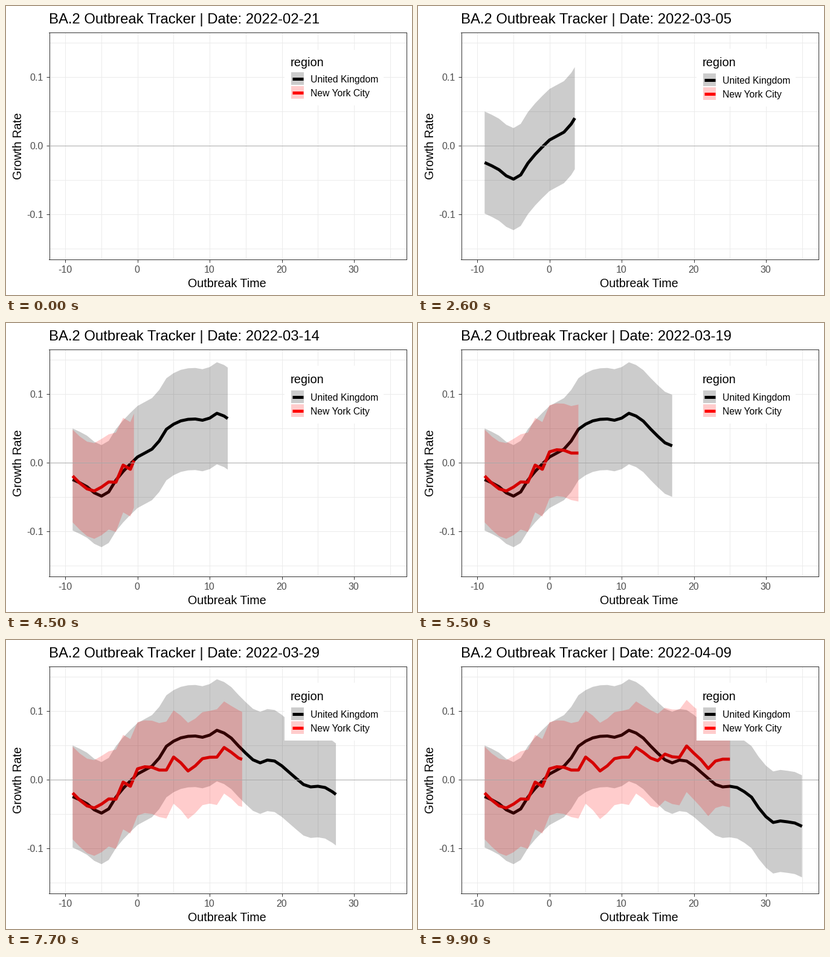
A matplotlib script for the animation above (10000 ms loop, 672 px wide and 480 px high).

```python
import matplotlib.pyplot as plt
import numpy as np
from matplotlib.animation import FuncAnimation
from matplotlib.patches import Rectangle

W, H = 672, 480
FRAMES, DAYS = 100, 47
START = np.datetime64("2022-02-21")
PT = 0.75  # points per pixel at 96 dpi
FIRST_X = -9

plt.rcParams["font.family"] = "Liberation Sans"
plt.rcParams["axes.unicode_minus"] = False

# Daily growth rates and interval half-widths, in thousandths
UK_RATE = [
    -24.5, -29.3, -35, -43.8, -48.6, -42.5, -25.4, -12.7, -1.8, 8.3, 14, 19.7,
    31.5, 48.6, 56, 60.8, 63, 63.5, 61.7, 64.8, 71.8, 67.8, 60.4, 49, 38.5,
    28.9, 24.5, 28.5, 27.1, 20.1, 10.9, 1.8, -7, -10.5, -9.6, -11.4, -17.5,
    -25.4, -41.1, -53.8, -62.2, -60, -61.3, -63, -67.8]
NYC_RATE = [
    -19.3, -29.8, -38.1, -41.1, -35.5, -28, -28.4, -3.5, -9.6, 15.8, 18.8, 18,
    14, 14, 32.9, 24.5, 12.7, 20.1, 30.6, 32.6, 32.8, 46.8, 39.8, 31.5, 27.6,
    37.2, 33.3, 32.4, 49, 38.5, 28.9, 16.2, 27.1, 29.8, 29.8]
NYC_HALF = [
    67.4, 67.8, 68.7, 69.6, 70, 69.2, 72.2, 68.7, 68.7, 67.8, 67.4, 67.8,
    68.3, 70.5, 67.8, 68.7, 70, 68.7, 67.6, 67.4, 69.6, 67, 67.4, 69.6, 68.3,
    67.4, 68.7, 69.6, 67, 67.4, 69.2, 69.2, 68.3, 67.8, 70]

fig = plt.figure(figsize=(W / 96, H / 96), dpi=96, facecolor="white")

# Plot panel
L, R, T, B = 71.5, 662.5, 43.5, 420.5
ax = fig.add_axes([L / W, 1 - B / H, (R - L) / W, (B - T) / H])
ax.set(xlim=(-12.25, 37.25), ylim=(-0.165, 0.165))
ax.set_axisbelow(True)
ax.set_xticks(range(-10, 31, 10), labels=[""] * 5)
ax.set_yticks([-0.1, 0, 0.1], labels=[""] * 3)
ax.set_xticks(range(-5, 36, 10), minor=True)
ax.set_yticks([-0.15, -0.05, 0.05, 0.15], minor=True)
ax.grid(which="both", color="#EBEBEB", lw=PT)
ax.tick_params(which="major", length=5 * PT, width=PT, color="#333333")
ax.tick_params(which="minor", length=0)
for spine in ax.spines.values():
    spine.set(color="#333333", linewidth=PT)
ax.axhline(0, color="#A9A9A9", lw=PT, zorder=4)

# Pixel overlay for text and legend
ui = fig.add_axes([0, 0, 1, 1])
ui.set(xlim=(0, W), ylim=(H, 0))
ui.axis("off")


def label(x, y, s, size, color="black", ha="left", **kw):
    return ui.text(x, y, s, fontsize=size * PT, color=color, ha=ha,
                   va="baseline", rotation_mode="anchor", **kw)


def box(x0, x1, height, color):
    patch = Rectangle((x0, 0), x1 - x0, height, fc=color, lw=0)
    return ui.add_patch(patch)


title = label(71, 29, "", 23.85)
label(366, 467, "Outbreak Time", 19.8, ha="center")
label(26, 232.5, "Growth Rate", 19.8, ha="center", rotation=90)
for v in range(-10, 31, 10):
    x = L + (v + 12.25) / 49.5 * (R - L)
    label(x - 0.5, 443, str(v), 16, "#4D4D4D", "center")
for v in (-0.1, 0, 0.1):
    y = B - (v + 0.165) / 0.33 * (B - T)
    label(62, y + 6, f"{v:.1f}", 16, "#4D4D4D", "right")


class Region:
    """A rate curve with its interval band, revealed day by day."""

    def __init__(self, color, rate, half, first_day):
        self.rate = np.array(rate) / 1000
        self.half = np.broadcast_to(np.array(half) / 1000, self.rate.shape)
        n = np.arange(len(rate))
        self.x = FIRST_X + n
        self.when = np.round((first_day + n) * (FRAMES - 1) / DAYS)
        self.line, = ax.plot([], [], color=color, lw=5 * PT, zorder=2,
                             solid_capstyle="butt", solid_joinstyle="round")
        self.band, = ax.fill([0, 0, 0], [0, 0, 0], color=color, alpha=0.2,
                             lw=0, zorder=3)

    def show(self, i):
        seen = i > self.when[0]
        self.line.set_visible(seen)
        self.band.set_visible(seen)
        if not seen:
            return
        head = np.interp(i, self.when, self.x)
        x = np.append(self.x[self.x < head], head)
        y = np.interp(x, self.x, self.rate)
        h = np.interp(x, self.x, self.half)
        self.line.set_data(x, y)
        self.band.set_xy(np.column_stack([np.r_[x, x[::-1]],
                                          np.r_[y + h, (y - h)[::-1]]]))


class Key:
    """One legend row."""

    def __init__(self, name, color, fill, top):
        self.top = top
        self.box = box(472, 493, 21, fill)
        self.line, = ui.plot([], [], color=color, lw=5 * PT,
                             solid_capstyle="butt")
        self.text = label(504, 0, name, 15.75)

    def move(self, dy):
        y = self.top + dy
        self.box.set_y(y)
        self.line.set_data([473.5, 491.5], [y + 10.5, y + 10.5])
        self.text.set_y(y + 17)


regions = [Region("black", UK_RATE, 74.2, 0),
           Region("red", NYC_RATE, NYC_HALF, 13)]
panel = box(461, 625, 96, "white")
label(471, 100, "region", 20)
keys = [Key("United Kingdom", "black", "#CCCCCC", 112),
        Key("New York City", "red", "#FFCCCC", 135)]


def update(i):
    day = START + i * DAYS // (FRAMES - 1)
    title.set_text(f"BA.2 Outbreak Tracker | Date: {day}")
    for region in regions:
        region.show(i)
    # The legend is slightly tighter before any data appears
    inset = 2 if i == 0 else 0
    panel.set_y(71 + inset)
    panel.set_height(96 - 2 * inset)
    for key in keys:
        key.move(-inset)
    return []


anim = FuncAnimation(fig, update, frames=FRAMES, interval=100, repeat=True,
                     repeat_delay=0, blit=False)
plt.show()
```
